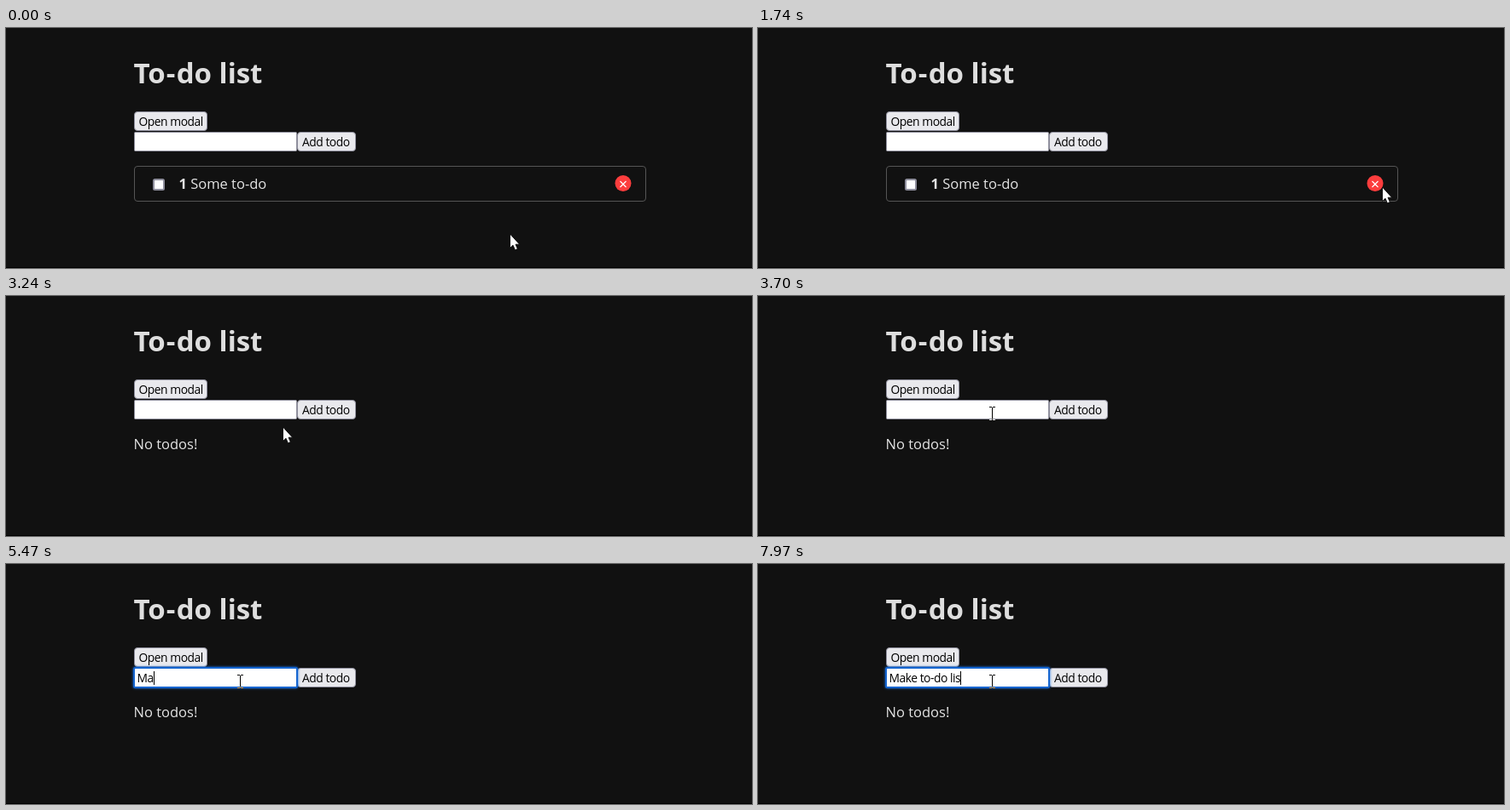
Recreate the animation shown at these times as an HTML page. Size 874 by 282 pixels, loop 8 s.

```html
<!DOCTYPE html>
<html lang="en">
<head>
<meta charset="utf-8">
<title>To-do list</title>
<style>
  html, body { margin: 0; width: 100%; height: 100%; overflow: hidden; background: #111; }
  svg { display: block; width: 874px; height: 282px; }
  text { font: 16.5px "Open Sans", "Noto Sans", sans-serif; fill: #e4e4e4; white-space: pre; }
  .title { font-size: 33px; font-weight: 700; fill: #dedede; }
  .label { font-size: 13.8px; letter-spacing: -.45px; fill: #000; }
  .button { fill: #e9e9ed; stroke: #8f8f9d; }
  #ring { fill: #fff; stroke: #1565d0; stroke-width: 2; filter: drop-shadow(0 0 1.8px #1470e6); }
  #beam { mix-blend-mode: difference; fill: none; stroke: #fff; }
</style>
</head>
<body>
<svg viewBox="0 0 874 282">
  <rect width="874" height="282" fill="#111"/>
  <path d="M0 281.5H874" stroke="#000"/>

  <text class="title" x="149.5" y="65" dx="0 0 1 1.3">To-do list</text>

  <rect class="button" x="150.5" y="98.5" width="85" height="22" rx="3.5"/>
  <text class="label" x="155.5" y="115">Open modal</text>

  <rect x="150.5" y="122.5" width="190" height="22" rx="1" fill="#fff" stroke="#8f8f9d"/>
  <rect class="button" x="341.5" y="122.5" width="68" height="22" rx="3.5"/>
  <text class="label" x="347" y="139">Add todo</text>

  <rect id="ring" x="150" y="122" width="191" height="23" rx="1.5"/>
  <text id="typed" class="label" x="153.5" y="139"></text>
  <rect id="caret" y="126" width="1" height="16"/>

  <g id="item">
    <rect x="150.5" y="162.5" width="599" height="41" rx="3.5" fill="none" stroke="#555"/>
    <rect x="173" y="178" width="12" height="12" rx="1.5" fill="#fff" stroke="#8f8f9d" stroke-width="2"/>
    <text x="202.5" y="189"><tspan font-weight="700">1</tspan> Some to-do</text>
    <circle cx="723" cy="182.5" r="9.5" fill="#fc3d3d"/>
    <path d="M719.5 180l7 7m0-7l-7 7" stroke="#fff" stroke-width="1.2"/>
  </g>
  <text id="empty" x="149.5" y="180">No todos!</text>

  <path id="arrow" d="M.5 0V16.5L4 13.2L6.4 18.8L9.3 17.6L7 12.2H11.6Z" fill="#fff" stroke="#000" stroke-width=".8"/>
  <path id="beam" d="M-3 -7.5H0M1 -7.5H4M.5 -7V7M-3 7.5H0M1 7.5H4"/>
</svg>
<script>
  const LOOP = 8000, DELETED = 2440, FOCUSED = 4060;
  const $ = id => document.getElementById(id);
  const smooth = p => p * p * (3 - 2 * p);
  const easeOut = p => 1 - (1 - p) ** 2;

  // pointer stops: time, x, y, easing used to get there
  const stops = [
    [0, 590, 242], [1150, 590, 242], [1190, 591, 242],
    [1760, 731, 187, smooth], [1960, 721, 180, smooth],
    [2080, 721, 180], [2140, 726, 185], [2440, 726, 185],
    [3240, 324, 154, smooth], [3700, 274, 138, easeOut], [LOOP, 274, 138]
  ];

  const phrase = "Make to-do lis";
  const keys = [5270, 5440, 5610, 5710, 5820, 6150, 6630, 6680, 6820, 7000, 7210, 7420, 7560, 7750];

  function pointer(t) {
    const i = stops.findIndex(s => s[0] > t);
    const [t0, x0, y0] = stops[i - 1];
    const [t1, x1, y1, ease = p => p] = stops[i];
    const p = ease((t - t0) / (t1 - t0));
    return [Math.round(x0 + (x1 - x0) * p), Math.round(y0 + (y1 - y0) * p)];
  }

  const show = (id, on) => $(id).style.display = on ? "" : "none";

  function draw(now) {
    const t = now % LOOP;
    const [x, y] = pointer(t);
    const inField = x >= 150 && x < 341 && y >= 122 && y < 145;
    show("arrow", !inField);
    show("beam", inField);
    $(inField ? "beam" : "arrow").setAttribute("transform", `translate(${x} ${y})`);

    show("item", t < DELETED);
    show("empty", t >= DELETED);

    show("ring", t >= FOCUSED);
    $("ring").style.opacity = Math.min(1, (t - FOCUSED + 70) / 200);
    const count = keys.filter(k => k <= t).length;
    const typed = $("typed");
    typed.textContent = phrase.slice(0, count);
    $("caret").setAttribute("x", Math.round(153.4 + (count ? typed.getComputedTextLength() : 0)));
    show("caret", t >= FOCUSED && !(t >= 4690 && t < 5180));

    requestAnimationFrame(draw);
  }
  requestAnimationFrame(draw);
</script>
</body>
</html>
```
